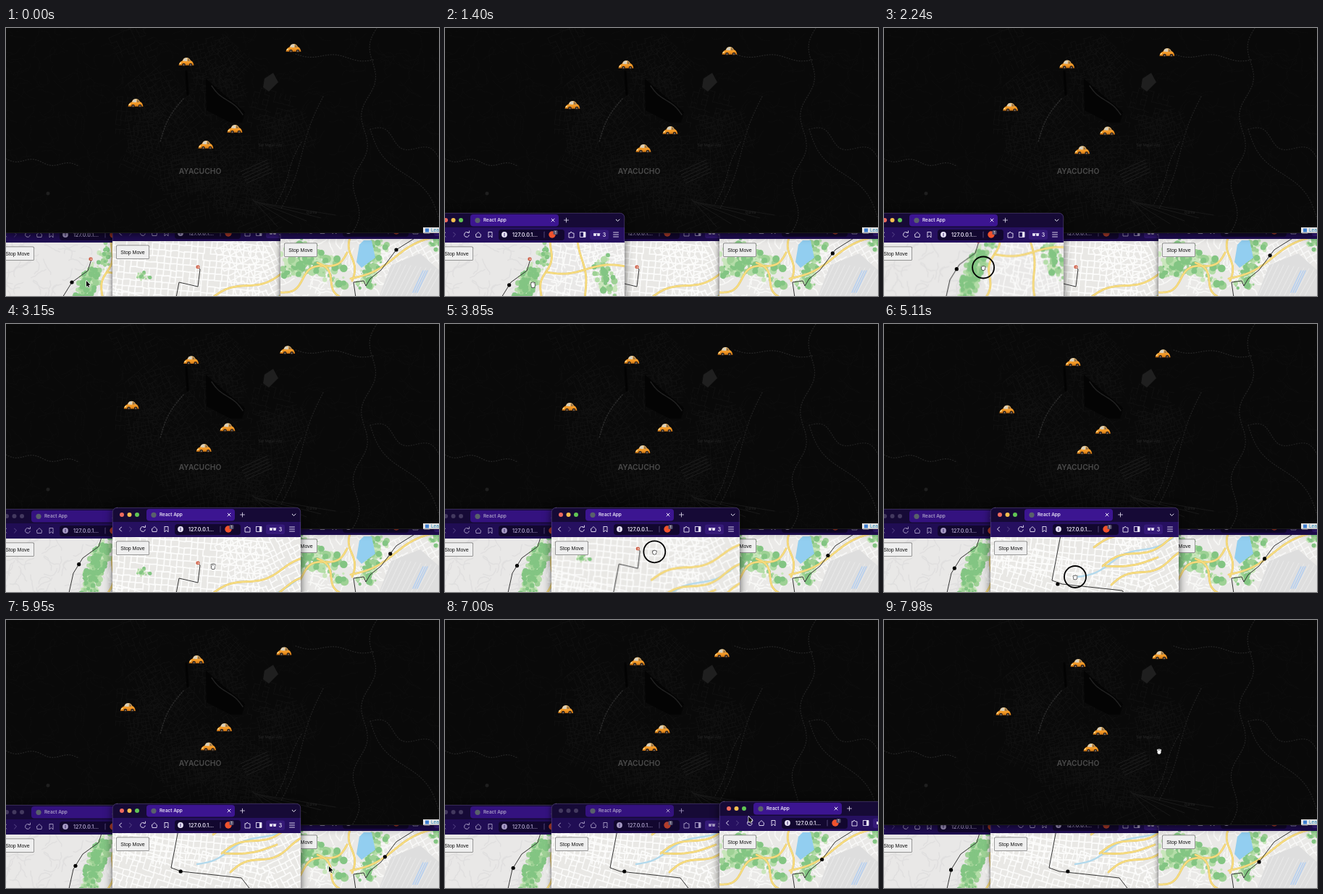
These frames come from a looping animation (598x371 px, 8 s). An HTML page with a canvas:

```html
<!DOCTYPE html>
<html lang="en">
<head>
<meta charset="utf-8">
<title>Vehicle tracking</title>
<style>
html, body { margin: 0; width: 100%; height: 100%; overflow: hidden; background: #090909; }
canvas { display: block; }
</style>
</head>
<body>
<canvas id="stage" width="598" height="371"></canvas>
<script>
const LOOP = 8000, STEP = 70;
const ctx = document.getElementById('stage').getContext('2d');

// ---------- helpers ----------
let seed = 7;
const rnd = () => (seed = (seed * 16807) % 2147483647) / 2147483647;
const spread = r => (rnd() + rnd() - 1) * r;
const mix = (a, b, k) => a + (b - a) * k;

function trace(g, s) {
  g.beginPath();
  s.split(' ').forEach(p => g.lineTo(...p.split(',')));
}
function stroke(g, color, width) {
  g.strokeStyle = color;
  g.lineWidth = width;
  g.lineJoin = g.lineCap = 'round';
  g.stroke();
}
function line(g, s, color, width = 1) {
  trace(g, s);
  stroke(g, color, width);
}
function area(g, s, color) {
  trace(g, s);
  g.fillStyle = color;
  g.fill();
}
function dot(g, x, y, r, color) {
  g.beginPath();
  g.arc(x, y, r, 0, 7);
  g.fillStyle = color;
  g.fill();
}
function box(g, x, y, w, h, r, color) {
  g.beginPath();
  g.roundRect(x, y, w, h, r);
  g.fillStyle = color;
  g.fill();
}
function label(g, s, x, y, font, color, align = 'left') {
  g.font = font;
  g.fillStyle = color;
  g.textAlign = align;
  g.textBaseline = 'middle';
  g.fillText(s, x, y);
}
function layer(x, y, w, h, color, paint) {
  const c = document.createElement('canvas');
  c.width = w;
  c.height = h;
  const g = c.getContext('2d');
  g.translate(-x, -y);
  g.fillStyle = color;
  g.fillRect(x, y, w, h);
  paint(g);
  return { x, y, c };
}

// ---------- map features ----------
// Winding line between two places: a sine bend across the straight way
function wave(g, x1, y1, x2, y2, bend, turns, color, width) {
  const len = Math.hypot(x2 - x1, y2 - y1), nx = (y1 - y2) / len, ny = (x2 - x1) / len;
  g.beginPath();
  for (let i = 0; i <= 40; i++) {
    const k = i / 40, off = bend * Math.sin(k * turns * Math.PI * 2);
    g.lineTo(mix(x1, x2, k) + nx * off, mix(y1, y2, k) + ny * off);
  }
  stroke(g, color, width);
}
function yellowRoad(g, ...way) {
  wave(g, ...way, '#e3c25f', 2.8);
  wave(g, ...way, '#f8de82', 1.9);
}
// Rotated street grid with randomly missing blocks
function streets(g, cx, cy, w, h, angle, gap, color, width, keep = 0.85) {
  g.save();
  g.translate(cx, cy);
  g.rotate(angle);
  g.beginPath();
  for (let x = -w / 2; x < w / 2; x += gap) {
    for (let y = -h / 2; y < h / 2; y += gap) {
      const j = spread(gap * 0.2);
      if (rnd() < keep) { g.moveTo(x, y); g.lineTo(x + gap, y + j); }
      if (rnd() < keep) { g.moveTo(x + j, y); g.lineTo(x + j, y + gap); }
    }
  }
  stroke(g, color, width);
  g.restore();
}
// Random walks that read as contour lines and footpaths
function paths(g, x, y, w, h, count, color, width) {
  for (let i = 0; i < count; i++) {
    let px = x + rnd() * w, py = y + rnd() * h, a = rnd() * 7;
    g.beginPath();
    for (let n = 0; n < 9; n++) {
      g.lineTo(px, py);
      a += spread(1);
      px += 3 * Math.cos(a);
      py += 3 * Math.sin(a);
    }
    stroke(g, color, width);
  }
}
function woods(g, x1, y1, x2, y2, r, count) {
  const greens = ['#c9e6bb', '#b4dda8', '#9ed195', '#83c583'];
  for (let i = 0; i < count; i++) {
    const k = rnd();
    dot(g, mix(x1, x2, k) + spread(r), mix(y1, y2, k) + spread(r), 1 + rnd() * r / 4, greens[i * 4 / count | 0]);
  }
}

// ---------- maps ----------
const darkMap = layer(0, 0, 598, 284, '#090909', g => {
  paths(g, 0, 0, 598, 284, 750, '#0f0f0f', 0.8);
  for (let i = 0; i < 34; i++) {
    streets(g, 285 + spread(140), 160 + spread(150), 55, 50, spread(1), 5 + rnd() * 3, '#131313', 0.7, 0.6);
  }
  area(g, '276,70 300,91 330,116 326,131 310,131 277,114', '#040404');
  wave(g, 284, 80, 327, 120, 2, 1, '#222', 1.4);
  area(g, '357,70 369,62 376,75 363,88 355,82', '#1f1f1f');
  for (let i = 0; i < 5; i++) {
    line(g, `${324 + i * 2},${199 + i * 4} ${360 + i * 2},${183 + i * 4}`, '#1e1e1e', 1);
    line(g, `${340 + i},${237 + i} ${375 + i * 20},${275 - i * 4}`, '#191919', 1);
  }
  g.setLineDash([1, 2.5]);
  wave(g, 0, 181, 100, 191, 3, 2, '#262626', 1.2);
  wave(g, 400, 36, 508, 44, 3, 1.5, '#262626', 1.2);
  wave(g, 512, 0, 478, 284, 7, 3, '#242424', 1.2);
  wave(g, 503, 140, 598, 180, -8, 1.5, '#222', 1.2);
  wave(g, 503, 140, 598, 264, 9, 1, '#222', 1.2);
  wave(g, 245, 98, 213, 158, 5, .5, '#2a2a2a', 1.6);
  wave(g, 438, 95, 380, 250, 3, 1, '#222', 1.2);
  wave(g, 408, 158, 372, 245, 2, 1, '#222', 1.2);
  g.setLineDash([]);
  line(g, '249,60 251,92', '#030303', 3);
  dot(g, 58, 229, 2.5, '#1f1f1f');
  label(g, 'San Miguel Alto', 365, 163, '4.5px "Open Sans", sans-serif', '#2c2c2c', 'center');
  label(g, 'Quinta', 422, 256, '4.5px "Open Sans", sans-serif', '#2c2c2c', 'center');
  label(g, 'AYACUCHO', 268, 198.5, '600 10.3px Inter, sans-serif', '#4b4b4b', 'center');
  box(g, 576, 276, 22, 8, 0, '#e4e4e4');
  box(g, 579, 277.5, 5, 5, 0, '#3f7fd0');
  label(g, 'Leaflet', 587, 280.3, '6.5px "Liberation Sans", sans-serif', '#2a86b5');
  line(g, '0,283.8 598,283.8', '#3a3a3a', .5);
});

const leftMap = layer(-40, 270, 310, 160, '#e9e8e7', g => {
  paths(g, -40, 270, 160, 160, 110, '#e0dfdf', 1.5);
  paths(g, 120, 270, 150, 160, 60, '#f7f7f6', 2);
  streets(g, 170, 350, 70, 170, .2, 8, '#fbfbfa', 1.5, .7);
  streets(g, 230, 340, 80, 170, -.25, 7, '#fbfbfa', 1.4, .75);
  woods(g, 121, 333, 98, 400, 14, 260);
  woods(g, 140, 300, 134, 330, 10, 40);
  woods(g, 216, 320, 226, 365, 16, 60);
  yellowRoad(g, 153, 275, 126, 400, 4, 2);
  yellowRoad(g, 184, 275, 199, 410, 3, 1.5);
  yellowRoad(g, 140, 338, 250, 330, 4, 1);
  line(g, '118,320 113,336 91,352 78,373 72,400', '#333');
});

const midMap = layer(120, 280, 320, 190, '#e9e8e5', g => {
  streets(g, 225, 350, 270, 120, .09, 9, '#fcfcfb', 1.7, .9);
  streets(g, 225, 430, 270, 90, .3, 8, '#fcfcfb', 1.5, .75);
  streets(g, 375, 360, 110, 170, -.45, 8, '#fcfcfb', 1.6, .75);
  woods(g, 185, 343, 195, 343, 7, 18);
  wave(g, 262, 415, 440, 340, 4, 2, '#b3d9ec', 2.4);
  for (let i = 0; i < 3; i++) {
    yellowRoad(g, 284 + i * 12, 374 + i * 26, 430, 322 + i * 26, -5, 1.5);
  }
  yellowRoad(g, 300, 400, 372, 388, 5, .5);
  line(g, '265,331 268,334 265,358 239,352 226,420 240,425 323,434 337,452', '#333');
});

const rightMap = layer(370, 280, 240, 100, '#eae9e7', g => {
  paths(g, 370, 285, 160, 90, 90, '#f8f8f6', 1.6);
  streets(g, 565, 315, 100, 55, -.5, 8, '#f9f9f8', 1.4, .7);
  woods(g, 385, 335, 425, 318, 16, 110);
  woods(g, 395, 300, 460, 345, 22, 110);
  woods(g, 515, 300, 495, 358, 15, 100);
  woods(g, 590, 292, 596, 302, 10, 30);
  area(g, '512,380 532,328 572,312 598,335 598,380', '#dedede');
  for (let i = 0; i < 10; i++) line(g, `${514 + i * 7},378 ${538 + i * 7},${326 + i}`, '#ebebeb', 1);
  for (let i = 0; i < 3; i++) line(g, `${562 + i * 3},366 ${576 + i * 3},336`, '#b5cff0', 1.6);
  area(g, '488,300 494,294 505,294 510,318 491,332 484,324', '#92cef0');
  yellowRoad(g, 379, 366, 471, 311, 7, 1.5);
  yellowRoad(g, 477, 285, 478, 350, 4, 1);
  yellowRoad(g, 430, 325, 468, 375, -6, 1);
  yellowRoad(g, 476, 347, 598, 288, 5, 1);
  line(g, '566,290 539,307 518,335 503,347 497,357 494,350 480,352 484,380', '#333');
});

// ---------- motion ----------
// Points are [time, x, y]
function along(keys, t) {
  let i = 0;
  while (i < keys.length - 2 && t >= keys[i + 1][0]) i++;
  const [a, b] = [keys[i], keys[i + 1]];
  const k = Math.max(0, Math.min(1, (t - a[0]) / (b[0] - a[0])));
  return [mix(a[1], b[1], k), mix(a[2], b[2], k)];
}
const TURNS = [0, 1400, 3850, 7980];
const cars = [
  '249,47 250,51 258,50 268,60', '397,28 393,32 387,38 381,49', '179,104 176,107 172,115 165,127',
  '316,140 311,142 304,144 299,154', '276,162 274,167 273,174 286,177'
].map(way => way.split(' ').map((p, i) => [TURNS[i], ...p.split(',').map(Number)]));

const drive = (x1, y1, x2, y2) => [[0, x1, y1], [LOOP, x2, y2]];
const windows = {
  left: { x: -12, y: 256, map: leftMap, pin: [117, 320], route: drive(91, 352, 77.5, 374) },
  mid: { x: 147, y: 254, map: midMap, pin: [265, 331], route: drive(202, 425, 252, 425) },
  right: { x: 379, y: 251, map: rightMap, route: drive(539, 307, 518, 335) }
};
const clicks = [[490, 'left'], [2940, 'mid'], [6230, 'right'], [7630, 'dark']];

// A fourth entry names the map dragged until the next point
const pointer = [
  [0, 112, 354], [1750, 124, 356, 'left'], [2310, 139, 328], [2940, 285, 336], [3500, 288, 335, 'mid'],
  [4300, 291, 290], [4750, 261, 370, 'mid'], [5110, 264, 350, 'mid'], [5300, 260, 338],
  [5950, 447, 345], [6300, 449, 343], [7980, 380, 182]
];
function panOf(name, t) {
  const pan = [0, 0];
  pointer.forEach(([at, x, y, drag], i) => {
    if (drag !== name || t < at) return;
    const [px, py] = along(pointer, Math.min(t, pointer[i + 1][0]));
    pan[0] += px - x;
    pan[1] += py - y;
  });
  return pan;
}

// ---------- drawing ----------
const paintwork = ctx.createLinearGradient(0, -6, 0, 6);
['#eecb8c', '#f4a235', '#ee9220', '#a85b10'].forEach((c, i) => paintwork.addColorStop(i / 3, c));

function drawCar([x, y]) {
  ctx.save();
  ctx.translate(x, y);
  ctx.beginPath();
  ctx.moveTo(-10.5, 4.8);
  ctx.bezierCurveTo(-10, 1, -8, -.5, -5.5, -1.5);
  ctx.bezierCurveTo(-3, -8, 4, -7, 6, -2);
  ctx.bezierCurveTo(9, -1, 10, 2, 10.5, 4.8);
  ctx.closePath();
  ctx.fillStyle = paintwork;
  ctx.fill();
  area(ctx, '-5,-1.5 -3,-5 1,-5.6 1,-1', '#d8d0bd');
  area(ctx, '2,-5 4,-4 5,-1.6 2,-1', '#8f7350');
  line(ctx, '-9,2.2 -7.5,1.4', '#fff0b0', 1.2);
  for (const wheel of [-3.5, 6]) {
    dot(ctx, wheel, 4, 2.3, '#2b1d14');
    dot(ctx, wheel, 4, .9, '#8d8378');
  }
  ctx.restore();
}

function drawDark(t) {
  ctx.save();
  ctx.shadowColor = 'rgba(0,0,0,.8)';
  ctx.shadowBlur = 14;
  ctx.drawImage(darkMap.c, 0, 0);
  ctx.restore();
  cars.forEach(car => drawCar(along(car, t)));
}

// Title bar and toolbar, relative to the window corner
function drawChrome(active) {
  const ink = active ? '#e9e4f6' : '#a99dc6';
  box(ctx, 0, 0, 260, 22, [6, 6, 0, 0], '#160a36');
  ['#ed6a5e', '#f4bf4f', '#61c554'].forEach((c, i) => dot(ctx, 13 + i * 10.5, 10, 3, active ? c : '#43395f'));
  box(ctx, 47, 2, 122, 16.5, 4, active ? '#3c1591' : '#34127f');
  dot(ctx, 57, 10.3, 3.6, '#59616b');
  label(ctx, 'React App', 65, 10.5, '600 6.4px Inter, sans-serif', ink);
  line(ctx, '159,8 163,12', ink);
  line(ctx, '163,8 159,12', ink);
  line(ctx, '176.5,10 182.5,10', ink, .8);
  line(ctx, '179.5,7 179.5,13', ink, .8);
  line(ctx, '248,9 250.5,11.5 253,9', ink);

  box(ctx, 0, 20, 260, 21, 0, active ? '#261060' : '#200d54');
  box(ctx, 86, 23, 91, 15, 4, '#12072f');
  line(ctx, '12.5,27 9.5,30 12.5,33', ink);
  line(ctx, '23.5,27 26.5,30 23.5,33', '#5c4b8c');
  ctx.beginPath();
  ctx.arc(42, 30, 3.3, .3, 5.4);
  stroke(ctx, ink, 1);
  line(ctx, '43,27 45.5,27.5 45.5,25', ink, .9);
  line(ctx, '54.5,30 58,26.5 61.5,30 61,33.5 55,33.5 54.5,30', ink, .9);
  line(ctx, '72,26.5 77,26.5 77,34 74.5,31.5 72,34 72,26.5', ink, .9);
  dot(ctx, 94, 30, 3.9, ink);
  line(ctx, '94,28 94,32', '#382568');
  label(ctx, '127.0.0.1...', 105, 30.5, '600 7.1px Inter, sans-serif', ink);
  line(ctx, '149,26 149,34', '#62568a', .8);
  dot(ctx, 160, 30, 4.7, active ? '#f0522d' : '#b23d2b');
  box(ctx, 161.5, 24, 6, 6, 1.5, '#55506b');
  label(ctx, '1', 164.5, 27.2, '5px Inter, sans-serif', '#fff', 'center');
  line(ctx, '183,28 185,28 186,26 188,28 190,28 190,34 183,34 183,28', ink, .9);
  line(ctx, '198.5,26.5 206,26.5 206,33.5 198.5,33.5 198.5,26.5', ink, .9);
  box(ctx, 203, 26.5, 3, 7, 0, ink);
  box(ctx, 212, 23.5, 26, 13.5, 3, '#351a78');
  box(ctx, 217, 28.5, 4, 3.6, 1.5, ink);
  box(ctx, 222, 28.5, 4, 3.6, 1.5, ink);
  line(ctx, '217,28.5 226,28.5', ink, .8);
  label(ctx, '3', 232, 30.5, '600 7px Inter, sans-serif', ink, 'center');
  for (const y of [27, 30, 33]) line(ctx, `244.5,${y} 251.5,${y}`, ink, .9);
}

function drawWindow(name, active, t) {
  const { x, y, map, pin, route } = windows[name];
  ctx.save();
  ctx.translate(x, y);
  ctx.save();
  ctx.shadowColor = 'rgba(0,0,0,.65)';
  ctx.shadowBlur = active ? 12 : 7;
  box(ctx, 0, 0, 260, 140, 6, '#160a36');
  ctx.restore();
  drawChrome(active);
  ctx.beginPath();
  ctx.roundRect(.25, .25, 259.5, 140, 6);
  stroke(ctx, 'rgba(190,175,225,.4)', .6);
  ctx.restore();

  ctx.save();
  ctx.beginPath();
  ctx.rect(x, y + 41, 260, 140);
  ctx.clip();
  ctx.save();
  ctx.translate(...panOf(name, t));
  ctx.drawImage(map.c, map.x, map.y);
  if (pin) {
    box(ctx, pin[0] - 2.5, pin[1] - 2.5, 5, 4.5, 1.5, '#cf6049');
    dot(ctx, pin[0] + .5, pin[1], 1, '#f3d6c8');
  }
  dot(ctx, ...along(route, t), 2.6, '#000');
  ctx.restore();
  box(ctx, x + 5, y + 46.5, 46, 19.5, 2, '#767676');
  box(ctx, x + 5.7, y + 47.2, 44.6, 18.1, 1.5, '#efefef');
  label(ctx, 'Stop Move', x + 28, y + 56.7, '7px "Liberation Sans", Arial, sans-serif', '#111', 'center');
  ctx.restore();
}

// The map in front shows a hand; anything behind it shows an arrow
function drawPointer(t, front) {
  const [x, y] = along(pointer, t);
  const drag = pointer.findLast(k => k[0] <= t)[3];
  const win = windows[front];
  const over = win ? x > win.x && x < win.x + 260 && y > win.y + 41 : y < 284;
  ctx.save();
  ctx.translate(x, y);
  if (over) {
    for (const [color, grow] of [['#222', 1], ['#fff', 0]]) {
      for (let i = -2; i < 3; i++) line(ctx, `${i},0 ${i * 1.2},${(drag ? -1.5 : -3.2) + Math.abs(i) * .4}`, color, 1 + grow);
      dot(ctx, 0, 1.3, 2.4 + grow / 2, color);
    }
  } else {
    const shape = '-1,-4 -1,4 .8,2.5 2,5 3.2,4.4 2,2 4.5,1.8 -1,-4';
    line(ctx, shape, '#fff', 1.4);
    area(ctx, shape, '#000');
  }
  if (drag) {
    ctx.beginPath();
    ctx.arc(0, 0, 15, 0, 7);
    stroke(ctx, '#000', 1.8);
  }
  ctx.restore();
}

function draw(t) {
  let order = ['left', 'mid', 'right', 'dark'];
  for (const [at, name] of clicks) {
    if (t >= at) order = [...order.filter(n => n !== name), name];
  }
  ctx.fillStyle = '#090909';
  ctx.fillRect(0, 0, 598, 371);
  order.forEach((name, i) => name === 'dark' ? drawDark(t) : drawWindow(name, i === 3, t));
  drawPointer(t, order[3]);
}

const start = performance.now();
function tick() {
  const t = (performance.now() - start) % LOOP;
  draw(Math.floor(t / STEP) * STEP);
  requestAnimationFrame(tick);
}
tick();
</script>
</body>
</html>
```
